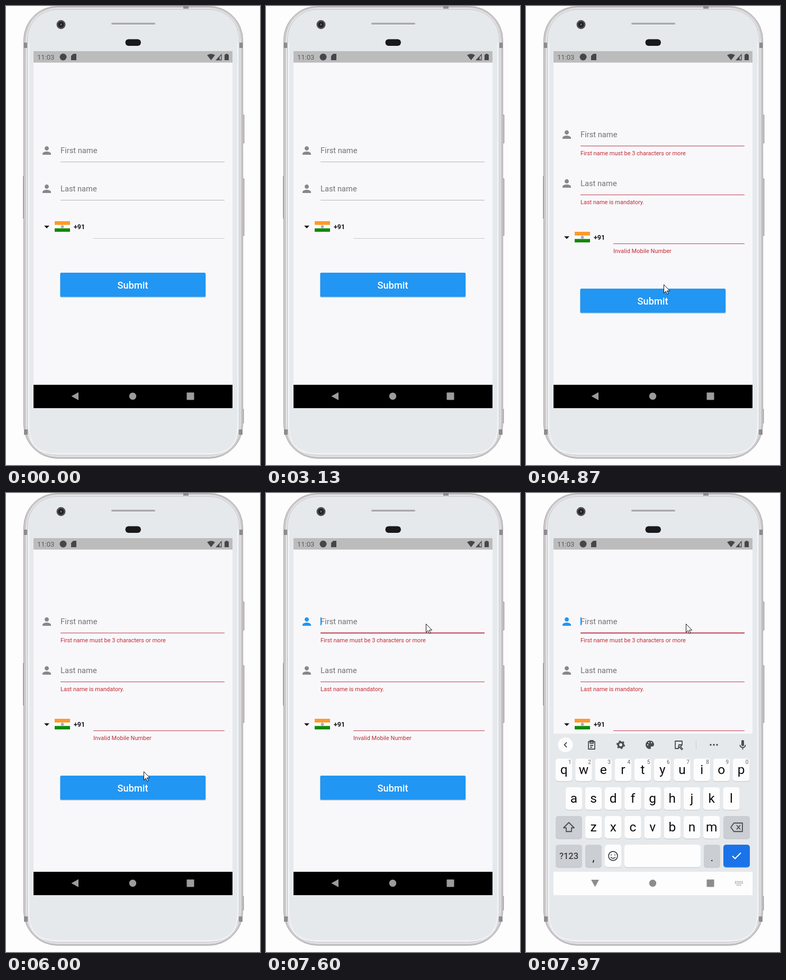
An HTML page that plays this animation: 480x864 px, repeating every 8000 ms.

```html
<!DOCTYPE html>
<html lang="en">
<head>
<meta charset="utf-8">
<title>Sign-up form</title>
<style>
  html, body { margin: 0; width: 100%; height: 100%; overflow: hidden; background: #fdfdfd; }
  svg { display: block; width: 100vw; height: 100vh; }
  text { font-family: Roboto, "Noto Sans", sans-serif; }
  .label { font-size: 14.7px; fill: #727275; }
  .error { font-size: 11px; fill: #c42b32; }
  .rule { stroke: #b6b6b4; }
  .rule.alert { stroke: #bd4050; }
  .key { fill: #0c0c0e; text-anchor: middle; }
  .hint { font-size: 10px; fill: #5c5e62; text-anchor: middle; }
  .icon { fill: none; stroke: #4a4d52; stroke-width: 1.8; stroke-linejoin: round; }
</style>
</head>
<body>
<svg viewBox="0 0 480 864">
  <defs>
    <clipPath id="screenClip"><path d="M52 85h376v672H52z"/></clipPath>
    <path id="person" d="M77 272c2.21 0 4-1.79 4-4s-1.79-4-4-4-4 1.79-4 4 1.79 4 4 4zm0 2c-2.67 0-8 1.34-8 4v2h16v-2c0-2.66-5.33-4-8-4z"/>
    <path id="erase" d="M-5-8H11V8H-5L-11 0zM0-4l7 8m0-8l-7 8"/>
    <path id="check" d="M-8 0l5 5L8-6" fill="none" stroke="#fff" stroke-width="2"/>
  </defs>

  <!-- Phone body -->
  <g fill="#cbc8cb" stroke="#a19da0">
    <path d="M446 205h4v53h-4zM446 325h4v107h-4zM446 759h3v26h-3z"/>
    <path d="M32.5 320v80" fill="none"/>
    <rect x="33.5" y=".5" width="414" height="851" rx="64" fill="#d3d0d2"/>
    <rect x="36.5" y="2.5" width="408" height="847" rx="61" fill="#e4e3e5" stroke="#b9b5b8"/>
    <rect x="40.5" y="6.5" width="400.500" height="839" rx="56" fill="#e6e9ec" stroke="#c6c4c8"/>
  </g>
  <path d="M43 70V790q0 53 54 53H385q53 0 53-53V70" fill="none" stroke="#f3f5f7" stroke-width="2"/>
  <path d="M34 69h6v10h-6zM441 69h6v10h-6zM34 797h7v10h-7zM440 797h7v10h-7zM335 0h10v5h-10z" fill="#8f8c90"/>
  <rect x="199" y="31.5" width="83" height="3.5" rx="1.7" fill="#a9a9ac"/>
  <path d="M200 35.5h81" stroke="#f4f5f7"/>
  <rect x="225.5" y="62.5" width="29.5" height="12.5" rx="6.2" fill="#19191b"/>
  <circle cx="104" cy="35" r="8.5" fill="#505054"/>
  <circle cx="104" cy="35" r="5.5" fill="#202024"/>
  <circle cx="104" cy="35" r="2" fill="#5c5c64"/>

  <g clip-path="url(#screenClip)">
    <path d="M52 85h376v672H52z" fill="#f8f8fb"/>
    <path d="M52 85h376v21.500H52z" fill="#bcbcbd"/>
    <g fill="#46464a">
      <text x="59" y="101" font-size="13" fill="#5c5c60">11:03</text>
      <circle cx="108" cy="96" r="6.5"/>
      <path d="M127 90h6v12h-10V94z"/>
      <path d="M380 92.500q7.500-5 15 0L387.500 102z"/>
      <path d="M397.500 101.500h9.500V91.500zM403 101V95" fill="none" stroke="#46464a" stroke-width="1.3"/>
      <path d="M397 102l6-6v6z"/>
      <path d="M415 90h4v1.500h2V102h-8V91.500h2z"/>
    </g>

    <g id="firstRow">
      <use id="firstIcon" href="#person"/>
      <text class="label" x="103" y="277">First name</text>
      <path class="rule" d="M103 293.500h310"/>
      <path class="rule alert" id="firstLine" d="M103 293.500h310"/>
      <text class="error alert" x="103" y="311">First name must be 3 characters or more</text>
      <path id="caret" d="M103.800 264v15" stroke="#2196f3" stroke-width="2"/>
    </g>
    <g id="lastRow">
      <use href="#person" y="72" fill="#88888b"/>
      <text class="label" x="103" y="349">Last name</text>
      <path class="rule" d="M103 365.500h310"/>
      <path class="rule alert" d="M103 365.500h310"/>
      <text class="error alert" x="103" y="383">Last name is mandatory.</text>
    </g>
    <g id="countryRow">
      <path d="M72 413.500h10l-5 5z" fill="#111"/>
      <path d="M92 405h29v20H92z" fill="#fdfdfd"/>
      <path d="M92 405h29v7H92z" fill="#ff9a28"/>
      <path d="M92 418.500h29v6.500H92z" fill="#138808"/>
      <circle cx="106.500" cy="415.300" r="2.300" fill="#b4b6cc" stroke="#777b9a" stroke-width=".8"/>
      <text x="128" y="420" font-size="12.6" font-weight="700" fill="#1c1c1e">+91</text>
    </g>
    <g id="phoneRow">
      <path class="rule" id="phoneLine" d="M165 437.500h248"/>
      <path class="rule alert" d="M165 437.500h248"/>
      <text class="error alert" x="165" y="455">Invalid Mobile Number</text>
    </g>
    <g id="submit">
      <rect x="102" y="503" width="276" height="46" rx="2" fill="#cfd2d6"/>
      <rect x="102.500" y="502" width="274.500" height="45.500" rx="2" fill="#2196f3"/>
      <text x="239.500" y="531.500" font-size="18.2" font-weight="500" fill="#fff" text-anchor="middle">Submit</text>
    </g>

    <path d="M52 713h376v44H52z"/>
    <g id="numPad">
      <path d="M52 492h376v221H52z" fill="#e6e9ec"/>
      <path d="M52 713h376v60H52z" fill="#fdfdfe"/>
    </g>
    <g id="letterPad">
      <path d="M52 453h376v260H52z" fill="#e6e9ec"/>
      <path d="M52 713h376v44H52z" fill="#fdfdfe"/>
      <circle cx="74.500" cy="474" r="14" fill="#fdfdfe"/>
      <g class="icon">
        <path d="M77 469.500l-4.500 4.500 4.500 4.500"/>
        <path d="M118 468h12v14h-12zM121 471h6v-5h-6zM121 475h6m-6 3.500h4"/>
        <circle cx="179" cy="474" r="4.7" style="stroke-width: 3.6"/>
        <circle cx="179" cy="474" r="7.2" stroke-dasharray="3.5 4.040"/>
        <path d="M289 481h-7V467h13v7m-6 0h6l-3 3 4 5-2 1-4-5-2 2z"/>
        <path d="M404.500 474q0 5 5 5t5-5M409.500 479v4"/>
        <path d="M321.500 465v18" style="stroke: #cdd0d4; stroke-width: 1"/>
      </g>
      <g fill="#4a4d52">
        <path d="M234 466a8 8 0 1 0 0 16q2 0 2-2-1-3 2-3h2q2-1 2-4-1-7-8-7z"/>
        <path d="M229 474h2m0-4h2m3 0h2" stroke="#e6e9ec" stroke-width="2"/>
        <path d="M349 474h0m6 0h0m6 0h0" stroke="#4a4d52" stroke-width="3.6" stroke-linecap="round"/>
        <rect x="407" y="465" width="5" height="11.500" rx="2.5"/>
      </g>
    </g>

    <g id="nav">
      <path id="back" d="M-7 0L6.500-7.500V7.500z"/>
      <circle cx="239.500" cy="734.500" r="6.7"/>
      <rect x="341.500" y="727.500" width="14" height="14" rx="1"/>
      <path id="imeIcon" d="M395 731.500h15m-15 3h15m-12 3.500h9" fill="none" stroke="#8c8c8f" stroke-width="1.7" stroke-dasharray="2 1.2"/>
    </g>
  </g>
  <path id="pointer" d="M.5.500v16l3.700-3.500 2.600 5.700 2.400-1-2.600-5.600h5.100z" fill="#fff" stroke="#141416"/>
</svg>

<script>
const $ = id => document.getElementById(id);
const LOOP = 8000, POINTER = 4070, PRESS = 4140, FOCUS = 7560, LETTERS = 7840;
const colors = { light: '#fdfdfe', dim: '#cbced3', blue: '#1a73e8' };

function key(pad, x, y, w, h, color, content = '') {
  $(pad).insertAdjacentHTML('beforeend',
    `<rect x="${x}" y="${y + 1}" width="${w}" height="${h}" rx="5" fill="#bfc2c6"/>
    <rect x="${x}" y="${y}" width="${w}" height="${h}" rx="5" fill="${colors[color]}"/>
    <g transform="translate(${x + w / 2} ${y + h / 2})">${content}</g>`);
}

const glyph = (char, size, y) => `<text class="key" y="${y}" font-size="${size}">${char}</text>`;
const icon = d => `<path class="icon" d="${d}"/>`;
const erase = '<use href="#erase" class="icon"/>';
const check = '<use href="#check"/>';

// Number pad: three digit columns and one column of actions
const actions = [glyph('–', 22, 7), icon('M-9-2V3H9V-2'), erase, check];
['123', '456', '789', ',0.'].forEach((row, r) => {
  const y = 498 + r * 53.5;
  [...row].forEach((char, c) => key('numPad', 55.3 + c * 93.1, y, 89, 48, 'light', glyph(char, 27, 10)));
  key('numPad', 335, y, 89, 48, r < 3 ? 'dim' : 'blue', actions[r]);
});

// Letter pad
[['qwertyuiop', 56], ['asdfghjkl', 74.6], ['zxcvbnm', 111.8]].forEach(([row, left], r) => {
  [...row].forEach((char, c) => {
    const hint = r ? '' : `<text class="hint" x="11" y="-11">${(c + 1) % 10}</text>`;
    key('letterPad', left + c * 37.2, 500 + r * 54, 31.5, 42.5, 'light', glyph(char, 24.5, 8) + hint);
  });
});
const smile = '<circle class="icon" r="8.5"/>' + icon('M-4.500 2q4.500 5 9 0M-3.500-3v2m7-2v2');
[[56, 608, 50, 'dim', icon('M0-9L10 1H5V8H-5V1H-10z')],
 [373, 608, 50, 'dim', erase],
 [56, 662, 50, 'dim', '<text class="key" y="6" font-size="16.5" font-weight="500" fill-opacity=".75">?123</text>'],
 [112, 662, 31, 'dim', glyph(',', 20, 10)],
 [149, 662, 31, 'light', smile],
 [186, 662, 144, 'light'],
 [336, 662, 31, 'dim', glyph('.', 20, 10)],
 [373, 662, 50, 'blue', check]
].forEach(([x, y, w, color, content]) => key('letterPad', x, y, w, 42.5, color, content));

// Each track is a list of [time, value]; values ease between steps.
const tracks = {
  x: [[4300, 262], [4600, 260], [6200, 260], [6850, 302]],
  y: [[4300, 531], [4600, 524], [6200, 524], [6850, 246]],
  alert: [[4180, 0], [4400, 1]],
  slide: [[7630, 75], [7730, 22], [7810, 0]],
  fade: [[7630, 0], [7700, 1]],
  turn: [[7600, 0], [7730, -68], [7800, -90]]
};
const shifts = { firstRow: -30, lastRow: -10, countryRow: 20, phoneRow: 10, submit: 30 };

function at(name, t) {
  const steps = tracks[name];
  const next = steps.findIndex(([time]) => time > t);
  if (next === 0) return steps[0][1];
  if (next < 0) return steps[steps.length - 1][1];
  const [t0, a] = steps[next - 1], [t1, b] = steps[next];
  const p = (t - t0) / (t1 - t0);
  return a + (b - a) * p * p * (3 - 2 * p);
}

const set = (id, name, value) => $(id).setAttribute(name, value);
const move = (id, x, y) => set(id, 'transform', `translate(${x} ${y})`);
const show = (id, on) => { $(id).style.display = on ? '' : 'none'; };
const alerts = document.querySelectorAll('.alert');

function draw(t) {
  const pressed = t >= PRESS, focused = t >= FOCUS, letters = t >= LETTERS;
  const keyboard = t >= tracks.fade[0][0];

  for (const id in shifts) move(id, 0, pressed ? shifts[id] : 0);
  const alert = at('alert', t);
  alerts.forEach(el => { el.style.opacity = alert; });
  $('phoneLine').style.opacity = pressed ? 1 : .7;

  show('caret', focused);
  set('firstIcon', 'fill', focused ? '#2196f3' : '#88888b');
  set('firstLine', 'stroke-width', focused ? 2 : 1);

  show('numPad', keyboard && !letters);
  show('letterPad', letters);
  move('numPad', 0, at('slide', t));
  $('numPad').style.opacity = at('fade', t);
  set('nav', 'fill', keyboard ? '#8c8c8f' : '#9c9c9e');
  set('back', 'transform', `translate(130.500 734.500) rotate(${at('turn', t)})`);
  show('imeIcon', keyboard);

  show('pointer', t >= POINTER);
  move('pointer', at('x', t), at('y', t));
}

function frame() {
  draw(performance.now() % LOOP);
  requestAnimationFrame(frame);
}
frame();
</script>
</body>
</html>
```
